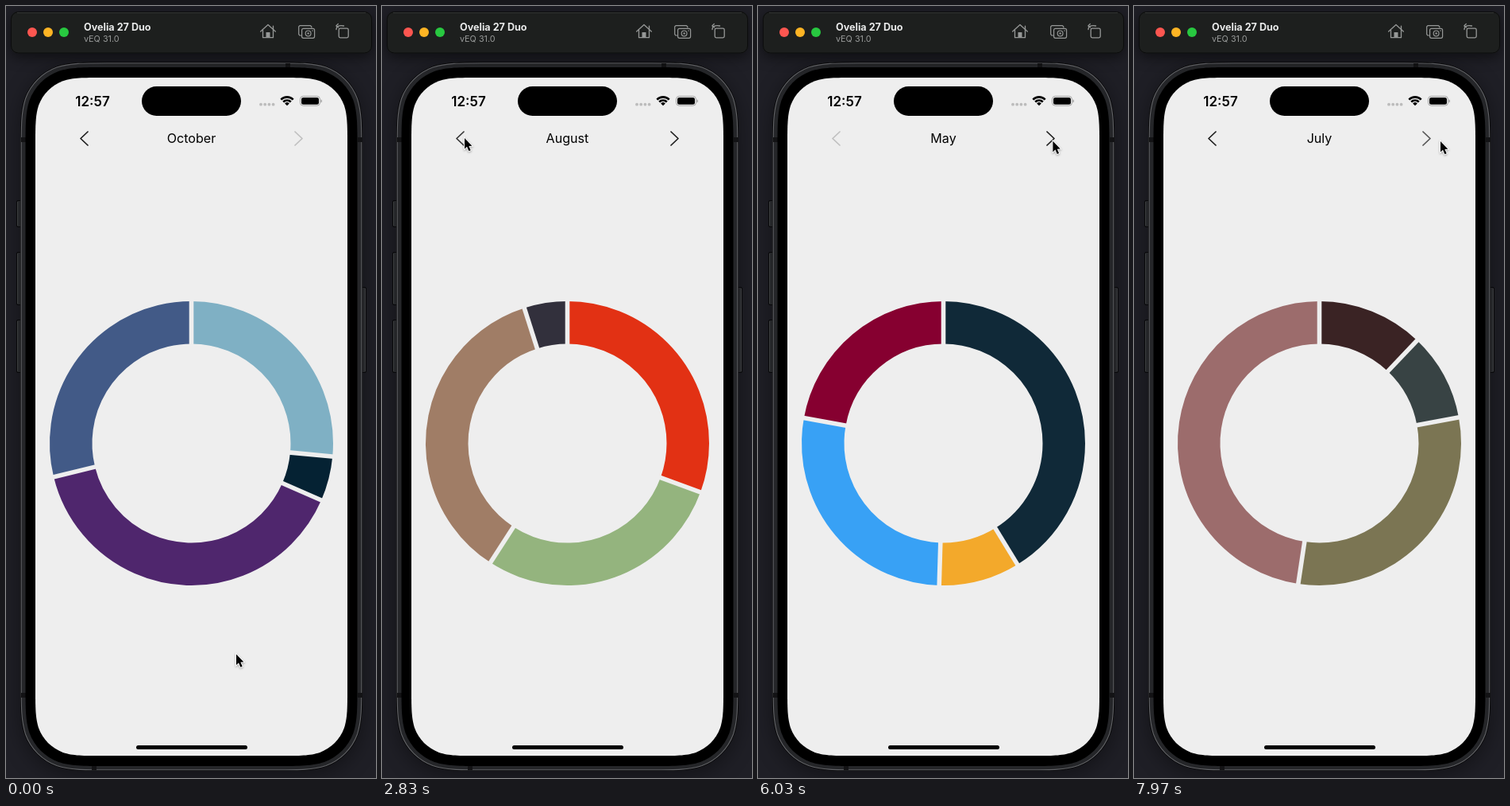
Animation of 466x970 px, one loop 8000 ms. Source, as an HTML page with a canvas:

```html
<!DOCTYPE html>
<html lang="en">
<head>
<meta charset="utf-8">
<title>Monthly donut chart</title>
<style>
html, body { margin: 0; width: 100%; height: 100%; overflow: hidden; background: #1f1f26; }
canvas { display: block; width: 466px; height: 970px; }
</style>
</head>
<body>
<canvas id="stage"></canvas>
<script>
const W = 466, H = 970, LOOP = 8000;
const MORPH = 900, SCREEN = '#eeeeee';
const canvas = document.getElementById('stage');
const ctx = canvas.getContext('2d');
const scale = window.devicePixelRatio || 1;
canvas.width = W * scale;
canvas.height = H * scale;

// cuts: slice borders in degrees, clockwise from the top
const MONTHS = [
  { name: 'May', cuts: [0, 148.5, 181.7, 280.3, 360], colors: ['#102938', '#f3a92b', '#38a1f5', '#860030'] },
  { name: 'July', cuts: [0, 43.6, 79.5, 188.6, 360], colors: ['#3a2324', '#384344', '#7b7553', '#9c6c6c'] },
  { name: 'August', cuts: [0, 110.1, 212.9, 342.3, 360], colors: ['#e23114', '#94b47e', '#a07d66', '#32303c'] },
  { name: 'September', cuts: [0, 119.4, 186.3, 309.6, 360], colors: ['#30a472', '#f6d31f', '#e34848', '#13678b'] },
  { name: 'October', cuts: [0, 95.3, 113.6, 256.3, 360], colors: ['#7fb0c4', '#052233', '#4f266d', '#425a87'] }
];

// Button presses: down and up times, direction
const PRESSES = [
  { down: 740, up: 840, step: -1 },
  { down: 1685, up: 1785, step: -1 },
  { down: 2790, up: 2885, step: -1 },
  { down: 3770, up: 3875, step: -1 },
  { down: 6910, up: 7015, step: 1 },
  { down: 7910, up: 8015, step: 1 }
];

const POINTER = [[0, 290, 814.5], [120, 290, 814.5], [620, 104, 166], [5150, 104, 166], [6200, 386, 170], [LOOP, 386, 170]];

const clamp = x => Math.max(0, Math.min(1, x));
const mix = (a, b, k) => a + (b - a) * k;
const ease = x => x < 0.5 ? 2 * x * x : 1 - 2 * (1 - x) * (1 - x);

function mixColor(a, b, k) {
  const part = (c, i) => parseInt(c.slice(i, i + 2), 16);
  return `rgb(${[1, 3, 5].map(i => Math.round(mix(part(a, i), part(b, i), k))).join()})`;
}

function paint(fill, stroke, line) {
  if (fill) { ctx.fillStyle = fill; ctx.fill(); }
  if (stroke) { ctx.strokeStyle = stroke; ctx.lineWidth = line; ctx.stroke(); }
}

function box(x, y, w, h, r, fill, stroke, line = 1) {
  ctx.beginPath();
  ctx.roundRect(x, y, w, h, r);
  paint(fill, stroke, line);
}

// Rectangle whose corners have continuous curvature
function smoothBox(x, y, w, h, r, fill, stroke, line = 1) {
  // (ux, uy) points back along the incoming side, (vx, vy) along the outgoing one
  const corner = (ox, oy, ux, uy, vx, vy) => {
    const at = (a, b) => [ox + r * (a * ux + b * vx), oy + r * (a * uy + b * vy)];
    ctx.lineTo(...at(1.529, 0));
    ctx.bezierCurveTo(...at(1.088, 0), ...at(0.868, 0), ...at(0.631, 0.075));
    ctx.bezierCurveTo(...at(0.373, 0.169), ...at(0.169, 0.373), ...at(0.075, 0.631));
    ctx.bezierCurveTo(...at(0, 0.868), ...at(0, 1.088), ...at(0, 1.529));
  };
  ctx.beginPath();
  corner(x + w, y, -1, 0, 0, 1);
  corner(x + w, y + h, 0, -1, -1, 0);
  corner(x, y + h, 1, 0, 0, -1);
  corner(x, y, 0, 1, 1, 0);
  ctx.closePath();
  paint(fill, stroke, line);
}

function dot(x, y, r, fill) {
  ctx.beginPath();
  ctx.arc(x, y, r, 0, 7);
  ctx.fillStyle = fill;
  ctx.fill();
}

function trace(points, close) {
  ctx.beginPath();
  points.forEach(([x, y]) => ctx.lineTo(x, y));
  if (close) ctx.closePath();
}

function line(points, color, width) {
  trace(points);
  ctx.strokeStyle = color;
  ctx.lineWidth = width;
  ctx.stroke();
}

function label(str, x, y, font, color, align = 'left') {
  ctx.font = `${font} Inter, sans-serif`;
  ctx.fillStyle = color;
  ctx.textAlign = align;
  ctx.fillText(str, x, y);
}

function castShadow(alpha, blur, drop) {
  ctx.shadowColor = `rgba(0,0,0,${alpha})`;
  ctx.shadowBlur = blur * scale;
  ctx.shadowOffsetY = drop * scale;
}

function drawToolbar() {
  ctx.save();
  castShadow(0.5, 16, 5);
  box(6, 7, 455, 52.5, 9, '#1d1f1e');
  ctx.restore();
  box(6.5, 7.5, 454, 51.5, 9, null, '#0b0c0c');
  line([[14, 8.5], [453, 8.5]], '#343635', 1);
  ['#fc5650', '#fdb424', '#28c840'].forEach((c, i) => dot(33 + i * 20, 33, 6, c));
  label('Ovelia 27 Duo', 98, 31, '700 12.6px', '#e9eaea');
  label('vEQ 31.0', 98, 45, '400 10.8px', '#989a99');

  const ink = '#969897';
  ctx.lineJoin = ctx.lineCap = 'round';
  line([[320.7, 32], [330, 23.5], [339.3, 32]], ink, 1.3);
  line([[323.5, 30.5], [323.5, 39.7], [336.5, 39.7], [336.5, 25.2]], ink, 1.3);
  box(327.5, 33, 5, 7, 0.5, ink);

  line([[371.5, 37], [370, 37], [368.7, 35.7], [368.7, 26], [370, 24.6], [383.5, 24.6], [384.8, 26], [384.8, 27]], ink, 1.2);
  box(372.6, 28.3, 16, 12, 2, '#1d1f1e', ink, 1.2);
  ctx.beginPath();
  ctx.arc(380.6, 34.4, 3.4, 0, 7);
  ctx.stroke();
  dot(380.6, 34.4, 1.2, ink);
  dot(386.1, 31, 0.8, ink);

  box(419.2, 28.2, 12, 11.6, 1.8, null, ink, 1.3);
  ctx.beginPath();
  ctx.moveTo(425.5, 25);
  ctx.quadraticCurveTo(416, 23.5, 416, 29.5);
  ctx.stroke();
  line([[418.3, 22.5], [415.8, 25], [418.6, 27]], ink, 1.2);
}

function drawPhone() {
  ctx.save();
  castShadow(0.4, 26, 6);
  smoothBox(18, 70.5, 431, 890.5, 72, '#09090a');
  ctx.restore();

  [[244, 33], [309, 66], [394, 66]].forEach(([y, h]) => {
    box(13.5, y + 0.5, 8, h, 1.5, '#242528', '#08080a');
    line([[14.7, y + 2], [14.7, y + h - 1]], '#48494c', 0.8);
  });
  box(446, 353.5, 7.5, 107, 1.5, '#242528', '#08080a');
  line([[452.3, 355], [452.3, 459]], '#48494c', 0.8);

  smoothBox(18, 70.5, 431, 890.5, 72, '#09090a');
  smoothBox(19.2, 71.7, 428.6, 888.1, 71, '#252629', '#626367', 1.1);
  ctx.fillStyle = '#131315';
  ctx.fillRect(352, 72, 6, 5);
  ctx.fillRect(108, 955, 6, 5);
  [165, 863].forEach(y => {
    ctx.fillRect(19, y, 6, 6);
    ctx.fillRect(443, y, 6, 6);
  });
  smoothBox(24.5, 77, 418, 878, 66, '#000');
  smoothBox(37, 90, 393, 852, 55, SCREEN);
  box(171, 101, 125, 37, 18.5, '#000');
  box(164, 929, 140, 5, 2.5, '#000');
}

function drawStatus() {
  label('12:57', 109, 125.5, '600 17px', '#000', 'center');
  for (let i = 0; i < 4; i++) dot(321 + i * 5.2, 123.7, 1.9, '#bcbcbc');

  ctx.lineCap = 'butt';
  ctx.strokeStyle = '#000';
  ctx.lineWidth = 2.6;
  [6.8, 10.9].forEach(r => {
    ctx.beginPath();
    ctx.arc(354, 125.3, r, -Math.PI * 0.75, -Math.PI * 0.25);
    ctx.stroke();
  });
  ctx.beginPath();
  ctx.moveTo(354, 125.3);
  ctx.arc(354, 125.3, 4, -Math.PI * 0.75, -Math.PI * 0.25);
  ctx.fillStyle = '#000';
  ctx.fill();

  box(370.5, 113.4, 25, 11.8, 3.8, null, '#a2a2a2', 1);
  box(372, 114.9, 22, 8.8, 2.5, '#000');
  box(396.6, 117.4, 1.4, 4, [0, 1.4, 1.4, 0], '#a2a2a2');
}

// Dims while held, recovers after release
function pressAlpha(t, step) {
  let alpha = 1;
  for (const p of PRESSES) {
    if (p.step !== step || t < p.down) continue;
    const low = 1 - 0.8 * ease(clamp((Math.min(t, p.up) - p.down) / 150));
    alpha = t < p.up ? low : mix(low, 1, ease(clamp((t - p.up) / 250)));
  }
  return alpha;
}

function drawChevron(x, dir, alpha) {
  ctx.globalAlpha = alpha;
  ctx.lineCap = ctx.lineJoin = 'round';
  line([[x - dir * 4.5, 158], [x + dir * 4.5, 166.5], [x - dir * 4.5, 175]], '#1c1c1c', 1.7);
  ctx.globalAlpha = 1;
}

function drawDonut(from, to, k) {
  const cx = 233.5, cy = 549.5, outer = 178.5, inner = 125;
  const angle = i => (mix(from.cuts[i], to.cuts[i], k) - 90) * Math.PI / 180;
  ctx.lineCap = 'butt';
  for (let i = 0; i < 4; i++) {
    ctx.beginPath();
    ctx.arc(cx, cy, (outer + inner) / 2, angle(i), angle(i + 1));
    ctx.lineWidth = outer - inner;
    ctx.strokeStyle = mixColor(from.colors[i], to.colors[i], k);
    ctx.stroke();
  }
  for (let i = 0; i < 4; i++) {
    const c = Math.cos(angle(i)), s = Math.sin(angle(i));
    line([[cx + c * (inner - 2), cy + s * (inner - 2)], [cx + c * (outer + 2), cy + s * (outer + 2)]], SCREEN, 5.6);
  }
}

function drawPointer(t) {
  const n = POINTER.findIndex(p => p[0] > t);
  const a = POINTER[n - 1], b = POINTER[n];
  const k = ease((t - a[0]) / (b[0] - a[0]));
  ctx.save();
  ctx.translate(mix(a[1], b[1], k), mix(a[2], b[2], k));
  trace([[0, 0], [0, 13.6], [3, 10.8], [5.4, 16.3], [7.7, 15.3], [5.4, 10], [9.4, 9.7]], true);
  castShadow(0.35, 2.5, 1);
  ctx.lineJoin = 'miter';
  ctx.lineWidth = 1.8;
  ctx.strokeStyle = '#fff';
  ctx.stroke();
  ctx.shadowColor = 'transparent';
  ctx.fillStyle = '#000';
  ctx.fill();
  ctx.restore();
}

function draw(t) {
  let prev = 4, month = 4, since = -MORPH;
  for (const p of PRESSES) {
    if (t < p.up) break;
    prev = month;
    month += p.step;
    since = p.up;
  }
  const k = ease(clamp((t - since) / MORPH));

  ctx.setTransform(scale, 0, 0, scale, 0, 0);
  ctx.fillStyle = '#1f1f26';
  ctx.fillRect(0, 0, W, H);
  drawPhone();
  drawToolbar();
  drawStatus();
  drawChevron(98.5, -1, month === 0 ? 0.22 : pressAlpha(t, -1));
  drawChevron(368.5, 1, month === 4 ? 0.22 : pressAlpha(t, 1));
  label(MONTHS[month].name, 233.5, 172.3, '400 16.1px', '#000', 'center');
  drawDonut(MONTHS[prev], MONTHS[month], k);
  drawPointer(t);
}

const start = performance.now();
function tick() {
  draw((performance.now() - start) % LOOP);
  requestAnimationFrame(tick);
}
tick();
</script>
</body>
</html>
```
